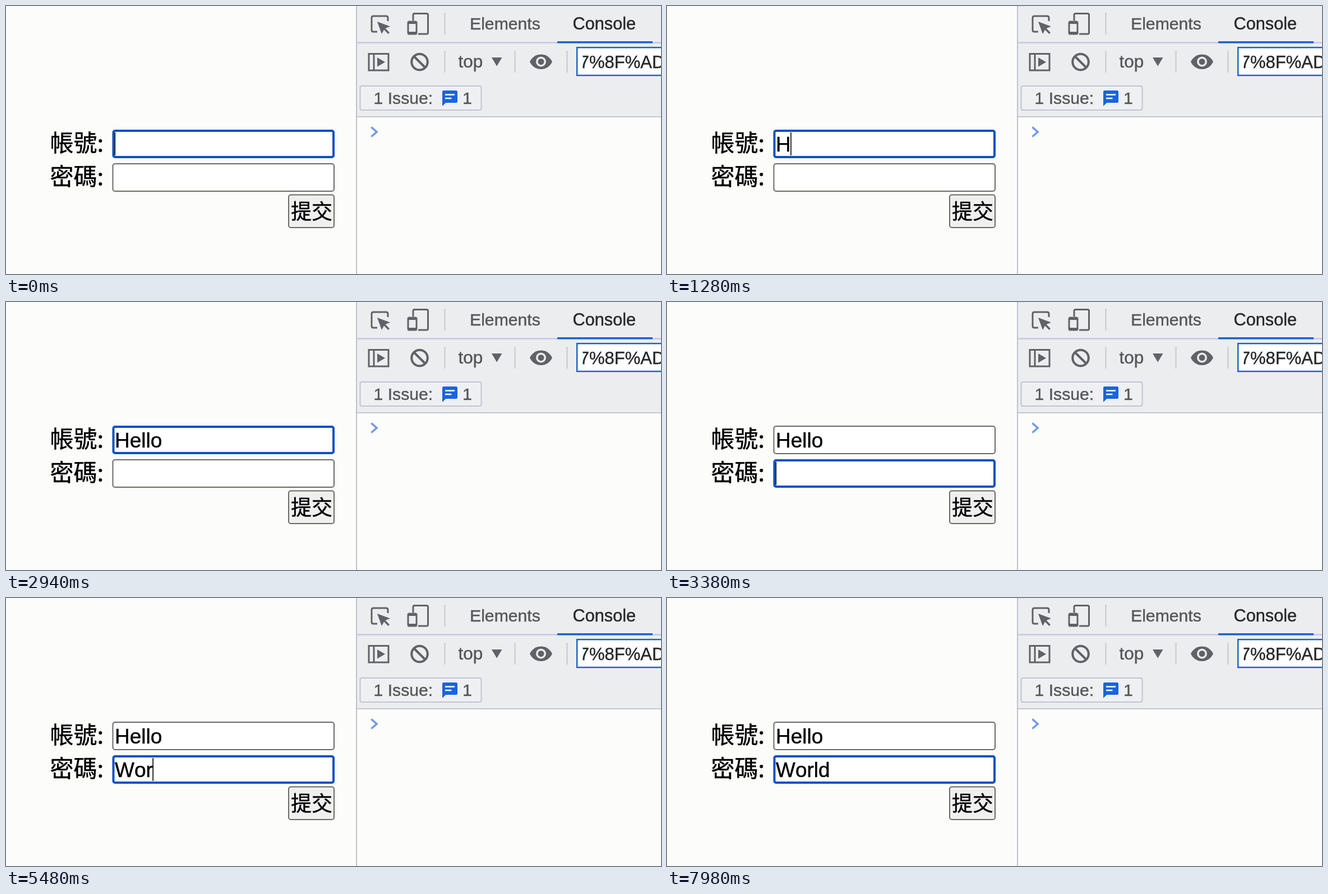
An HTML page that plays this animation: 1168x479 px, repeating every 8 s.

```html
<!DOCTYPE html>
<html lang="zh-Hant">
<head>
<meta charset="utf-8">
<title>Login form</title>
<style>
  html, body { margin: 0; width: 100%; height: 100%; overflow: hidden; background: #fcfcfb; }
  svg { display: block; width: 1168px; height: 479px; }
  text {
    font-family: "Liberation Sans", Arial, sans-serif; font-kerning: none; white-space: pre;
    fill: #000; stroke: #000; stroke-width: .45;
  }
  .cjk { font-family: "Noto Sans CJK TC", "Noto Sans CJK", sans-serif; }
  .ui { fill: #54575b; stroke: #54575b; font-size: 31px; }
  .dark { fill: #26282b; stroke: #26282b; }
  .icon { fill: none; stroke: #5f6266; stroke-width: 3; }
  .solid { fill: #5f6266; }
  .rule { stroke: #c6c8ce; stroke-width: 2; }
  .value { font-size: 37px; }
</style>
</head>
<body>
<svg viewBox="0 0 1168 479">
  <defs><clipPath id="filterClip"><rect x="1028.500" y="74" width="140" height="50"/></clipPath></defs>
  <rect width="1168" height="479" fill="#fcfcfb"/>

  <!-- Form -->
  <g font-size="42">
    <text class="cjk" x="78.500" y="259.700">帳號:</text>
    <text class="cjk" x="78.500" y="319.700">密碼:</text>
  </g>
  <rect x="504" y="337.500" width="81" height="58.500" rx="4" fill="#efefef" stroke="#6b6963" stroke-width="2"/>
  <text class="cjk" x="508" y="381" font-size="37">提交</text>
  <g id="fields"></g>
  <rect id="caret" width="1.6" height="41"/>

  <!-- Developer tools -->
  <rect x="625" width="543" height="198" fill="#ecedef"/>
  <path d="M625 65.500H1168" stroke="#bcc0e6" stroke-width="2"/>
  <path d="M625 198H1168" stroke="#c4c6d2" stroke-width="2"/>
  <path d="M625 0V479" stroke="#bfc0cf" stroke-width="2"/>
  <rect x="983" y="63" width="170" height="3.500" fill="#1465d8"/>
  <path class="rule" d="M782.500 12V51M782.500 80V119M907.500 80V119M1000.500 80V119"/>

  <path class="icon" d="M662 46H655Q652 46 652 43V21Q652 18 655 18H678Q681 18 681 21V27"/>
  <path class="solid" d="M662 28L685 36.500 676.500 40 684 47.500 681.500 50 674 42.500 670 50Z"/>
  <path class="icon" d="M726 26V16Q726 13.500 728.500 13.500H750Q752.500 13.500 752.500 16V47.500Q752.500 50 750 50H735"/>
  <path class="icon" d="M719 28H730Q732 28 732 30V48Q732 50 730 50H719Q717 50 717 48V30Q717 28 719 28Z"/>
  <path class="solid" d="M717 27H732V32H717ZM717 46H732V50H717Z"/>
  <text class="ui" x="827" y="42" style="font-size:30.200px">Elements</text>
  <text class="ui dark" x="1010.500" y="42" style="font-size:30.700px">Console</text>

  <path class="icon" d="M647 85.500H682V115H647ZM656 85.500V115"/>
  <path class="solid" d="M662 92L676 100.300 662 108.500Z"/>
  <g class="icon" style="stroke-width:4">
    <circle cx="737.500" cy="100" r="14.300"/>
    <path d="M727.500 90L747.500 110"/>
  </g>
  <text class="ui" x="806.500" y="110" style="font-size:31.500px">top</text>
  <path class="solid" d="M866 92H884.500L875.200 107.500Z"/>
  <path class="solid" d="M934 99.500C942 82 966 82 974 99.500C966 117.500 942 117.500 934 99.500Z"/>
  <circle cx="954" cy="99.500" r="9" fill="#ecedef"/>
  <circle class="solid" cx="954" cy="99.500" r="5.500"/>

  <rect x="1018.200" y="74.200" width="160" height="49.800" fill="#fff" stroke="#1c62cf" stroke-width="2.500"/>
  <text class="dark" x="1022.800" y="111" font-size="31" clip-path="url(#filterClip)">7%8F%AD</text>

  <rect x="631.500" y="143" width="216" height="43" rx="3" fill="#eff0f2" stroke="#c1c4d0" stroke-width="2"/>
  <text class="ui" x="655.500" y="175" style="font-size:30.200px">1 Issue:</text>
  <path d="M780.500 151H802.500Q805 151 805 153.500V170.500Q805 173 802.500 173H784L778 179V153.500Q778 151 780.500 151Z" fill="#1b63de"/>
  <path d="M783 158.500H800M783 165H794.500" stroke="#fff" stroke-width="2.500"/>
  <text class="ui" x="814" y="175" style="font-size:30.200px">1</text>
  <path d="M651.500 216.500L661 225 651.500 233.500" fill="none" stroke="#7299e6" stroke-width="3.600"/>
</svg>
<script>
const LOOP = 8000, BLINK = 500, TEXT_X = 194, FONT_SIZE = 37;
const FOCUS_SWITCH = 3240;
const advance = { H: .722, e: .556, l: .222, o: .556, W: .944, r: .333, d: .556 };

const fields = [
  { top: 221, word: "Hello", focusAt: 0, keys: [1200, 1560, 1800, 2100, 2400] },
  { top: 281, word: "World", focusAt: FOCUS_SWITCH, keys: [4300, 4700, 5100, 5900, 6400] }
];

function add(name, parent, attrs) {
  const node = document.createElementNS("http://www.w3.org/2000/svg", name);
  setAttrs(node, attrs);
  return parent.appendChild(node);
}

function setAttrs(node, attrs) {
  for (const key in attrs) node.setAttribute(key, attrs[key]);
}

const group = document.getElementById("fields");
const caret = document.getElementById("caret");
for (const field of fields) {
  field.box = add("rect", group, { fill: "#fff" });
  field.text = add("text", group, { class: "value", x: TEXT_X, y: field.top + 39 });
}

function drawField(field, focused, time) {
  const line = focused ? 4 : 2;
  setAttrs(field.box, {
    x: 189.5 + line / 2, y: field.top + line / 2,
    width: 396.5 - line, height: 51 - line, rx: focused ? 3 : 4,
    stroke: focused ? "#0750c4" : "#6a6964", "stroke-width": line
  });
  const count = field.keys.filter(key => key <= time).length;
  field.text.textContent = field.word.slice(0, count);
  return count;
}

function render(time) {
  const active = time < FOCUS_SWITCH ? 0 : 1;
  fields.forEach((field, i) => {
    const count = drawField(field, i === active, time);
    if (i !== active) return;
    const typed = [...field.word.slice(0, count)];
    const width = typed.reduce((sum, letter) => sum + advance[letter], 0) * FONT_SIZE;
    const lastInput = count ? field.keys[count - 1] : field.focusAt;
    const visible = Math.floor((time - lastInput) / BLINK) % 2 === 0;
    setAttrs(caret, {
      x: TEXT_X + width - .5, y: field.top + 5, visibility: visible ? "visible" : "hidden"
    });
  });
}

const start = performance.now();
function tick() {
  render((performance.now() - start) % LOOP);
  requestAnimationFrame(tick);
}
render(0);
tick();
</script>
</body>
</html>
```
